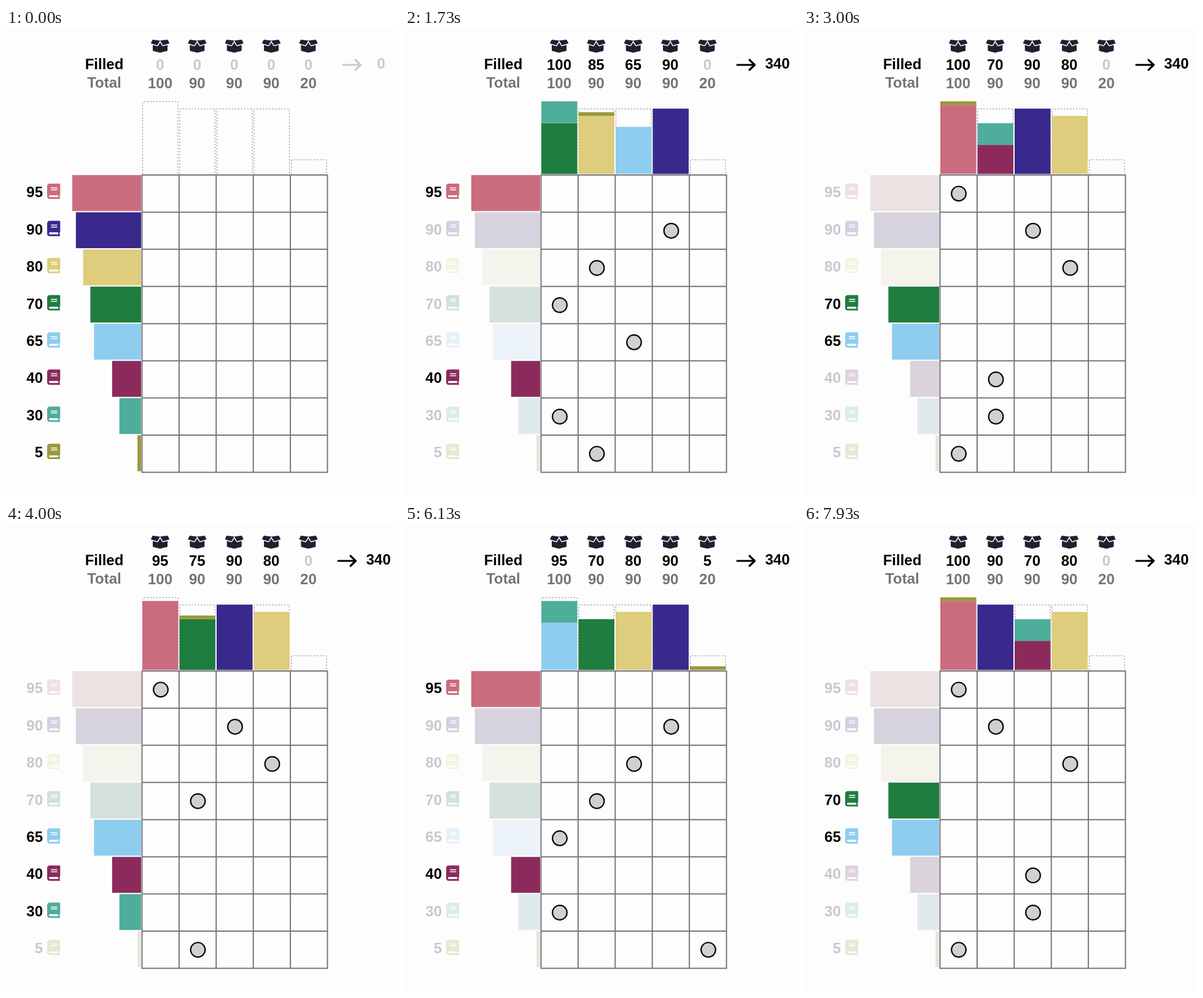
Recreate the animation shown at these times as an HTML page. Size 640x761 px, loop 8000 ms.

```html
<!DOCTYPE html>
<html lang="en">
<head>
<meta charset="utf-8">
<title>Filling boxes with books</title>
<style>
  html, body { margin: 0; width: 100%; height: 100%; overflow: hidden; background: #fefdfe; }
  svg { display: block; width: 640px; height: 761px; }
  text { font: bold 24px "Liberation Sans", Arial, sans-serif; text-anchor: middle; }
</style>
</head>
<body>
<svg id="stage" viewBox="0 0 640 761"></svg>
<script>
const LOOP = 8000;
const UNIT = 1.18;              // pixels per unit of weight
const STEP_X = 60.5, STEP_Y = 60.43;
const LEFT = 221.5, TOP = 239, FLOOR = 237.3;
const GRAY = '#cac8cc', LINE = '#79777c';

const caps = [100, 90, 90, 90, 20];

// weight, colour, faded bar, faded icon
const books = [
  [95, '#cb6c7e', '#ece2e2', '#efe0e4'],
  [90, '#3a298c', '#d6d3df', '#d5d0e2'],
  [80, '#decd7d', '#f4f3ec', '#f5f4e2'],
  [70, '#1e7d3f', '#d7e1db', '#d0e2d8'],
  [65, '#8ecdef', '#ecf3f9', '#e4f1f9'],
  [40, '#8c2b5b', '#dbd3db', '#dfd3de'],
  [30, '#4fad9c', '#e0eaea', '#d9eee9'],
  [5,  '#9a993c', '#e6e8da', '#e6e8d2']
].map(([weight, color, pale, paleIcon]) => ({ weight, color, pale, paleIcon }));

// start time and, for each book, its box (0 = left out)
const plan = [
  [0, '00000000'],
  [400, '04213012'],
  [2000, '04231011'],
  [2530, '13420001'],
  [3000, '13400221'],
  [3530, '13400222'],
  [3930, '13420002'],
  [4530, '12430003'],
  [5000, '12430001'],
  [5530, '04321012'],
  [6000, '04321015'],
  [6530, '14320002'],
  [6930, '12430003'],
  [7530, '12400331']
];

const stage = document.getElementById('stage');

function add(tag, attrs, parent = stage) {
  const node = document.createElementNS('http://www.w3.org/2000/svg', tag);
  set(node, attrs);
  parent.appendChild(node);
  return node;
}

function set(node, attrs) {
  for (const key in attrs) node.setAttribute(key, attrs[key]);
}

function label(text, x, y, fill, extra) {
  const node = add('text', { x, y, fill, ...extra });
  node.textContent = text;
  return node;
}

function drawBox(x, y) {
  const g = add('g', { transform: `translate(${x} ${y}) scale(.0469)`, fill: '#211f2f' });
  add('path', { d: 'M320 126 256 233Q238 260 201 254L64 215V393Q64 417 88 424L304 478H336L552 424Q576 417 576 393V215L439 254Q402 260 384 233Z' }, g);
  for (const flip of ['', 'translate(640 0) scale(-1 1)'])
    add('path', { d: 'M53 41 2 144Q-4 162 12 167L210 223Q222 225 228 216L320 64 70 32Q58 31 53 41Z', transform: flip }, g);
}

function drawBook(y) {
  const g = add('g', { transform: `translate(67 ${y})` });
  add('path', { d: 'M4.5 0H20Q21.3 0 21.3 1.4V17.6Q21.3 18.6 20.4 19V23Q21.3 23.2 21.3 24.2T20 25H4.5Q0 25 0 20.5V4.5Q0 0 4.5 0Z' }, g);
  add('path', { d: 'M4.6 18.9H18V22.1H4.6Q3 22.1 3 20.5T4.6 18.9ZM6.2 6.3H16.4V7.8H6.2ZM6.2 9.5H16.4V11H6.2Z', fill: '#fefdfe' }, g);
  return g;
}

const colMid = c => 251 + c * 60.35;

label('Filled', 160, 67, '#000');
label('Total', 160, 97, '#757378');

const boxes = caps.map((cap, c) => {
  const h = cap * UNIT, x = LEFT + c * STEP_X;
  drawBox(colMid(c) - 15, 17.5);
  label(cap, colMid(c), 97.5, '#757378');
  add('path', {
    d: `M${x + 1} ${FLOOR}v${-h + .5}h57.5v${h - .5}`,
    fill: 'none', stroke: '#737177', 'stroke-dasharray': '2 3'
  });
  return { x: x + .5, count: label('0', colMid(c), 68, GRAY) };
});

const rows = books.map((book, r) => {
  const y = TOP + r * STEP_Y, w = book.weight * UNIT;
  return {
    name: label(book.weight, 60, y + 36.3, '#000', { style: 'text-anchor:end' }),
    icon: drawBook(y + 14),
    bar: add('rect', { x: 220 - w, y: y + .2, width: w, height: 58.4 }),
    fill: add('rect', { width: 58.5, height: w })
  };
});

let grid = '';
for (let c = 0; c <= 5; c++) grid += `M${LEFT + c * STEP_X - c * .1} ${TOP - 1}V${TOP + 8 * STEP_Y + 1}`;
for (let r = 0; r <= 8; r++) grid += `M${LEFT} ${TOP + r * STEP_Y}H${LEFT + 5 * STEP_X - .5}`;
add('path', { d: grid, fill: 'none', stroke: LINE, 'stroke-width': 2 });

for (const row of rows)
  row.dot = add('circle', { r: 11.8, fill: '#d0cfd2', stroke: '#000', 'stroke-width': 2.2 });

const arrow = add('path', {
  d: 'M1.5 60H30M21.5 51.8 30 60 21.5 68.2', fill: 'none', 'stroke-width': 3.2,
  'stroke-linecap': 'round', 'stroke-linejoin': 'round'
});
const total = label('0', 611, 65.5, GRAY);

function show(code) {
  const sums = caps.map(() => 0);
  books.forEach((book, r) => {
    const { name, icon, bar, fill, dot } = rows[r];
    const c = code[r] - 1, used = c >= 0;
    set(name, { fill: used ? GRAY : '#000' });
    set(icon, { fill: used ? book.paleIcon : book.color });
    set(bar, { fill: used ? book.pale : book.color });
    const visibility = used ? 'visible' : 'hidden';
    set(fill, { visibility });
    set(dot, { visibility });
    if (!used) return;
    sums[c] += book.weight;
    set(fill, { x: boxes[c].x, y: FLOOR - sums[c] * UNIT, fill: book.color });
    set(dot, { cx: 252 + c * STEP_X, cy: 269.3 + r * STEP_Y });
  });
  boxes.forEach(({ count }, c) => {
    count.textContent = sums[c];
    set(count, { fill: sums[c] ? '#000' : GRAY });
  });
  const sum = sums.reduce((a, b) => a + b);
  const ink = sum ? '#000' : GRAY;
  total.textContent = sum;
  set(total, { x: sum ? 606.5 : 611, fill: ink });
  set(arrow, { stroke: ink, transform: `translate(${sum ? 539.5 : 547.5} 0)` });
}

let shown = '';
function draw(now) {
  const t = now % LOOP;
  let code = plan[0][1];
  for (const [start, next] of plan) if (t >= start) code = next;
  if (code !== shown) show(shown = code);
}

const begin = performance.now();
function tick() {
  draw(performance.now() - begin);
  requestAnimationFrame(tick);
}
tick();
</script>
</body>
</html>
```
